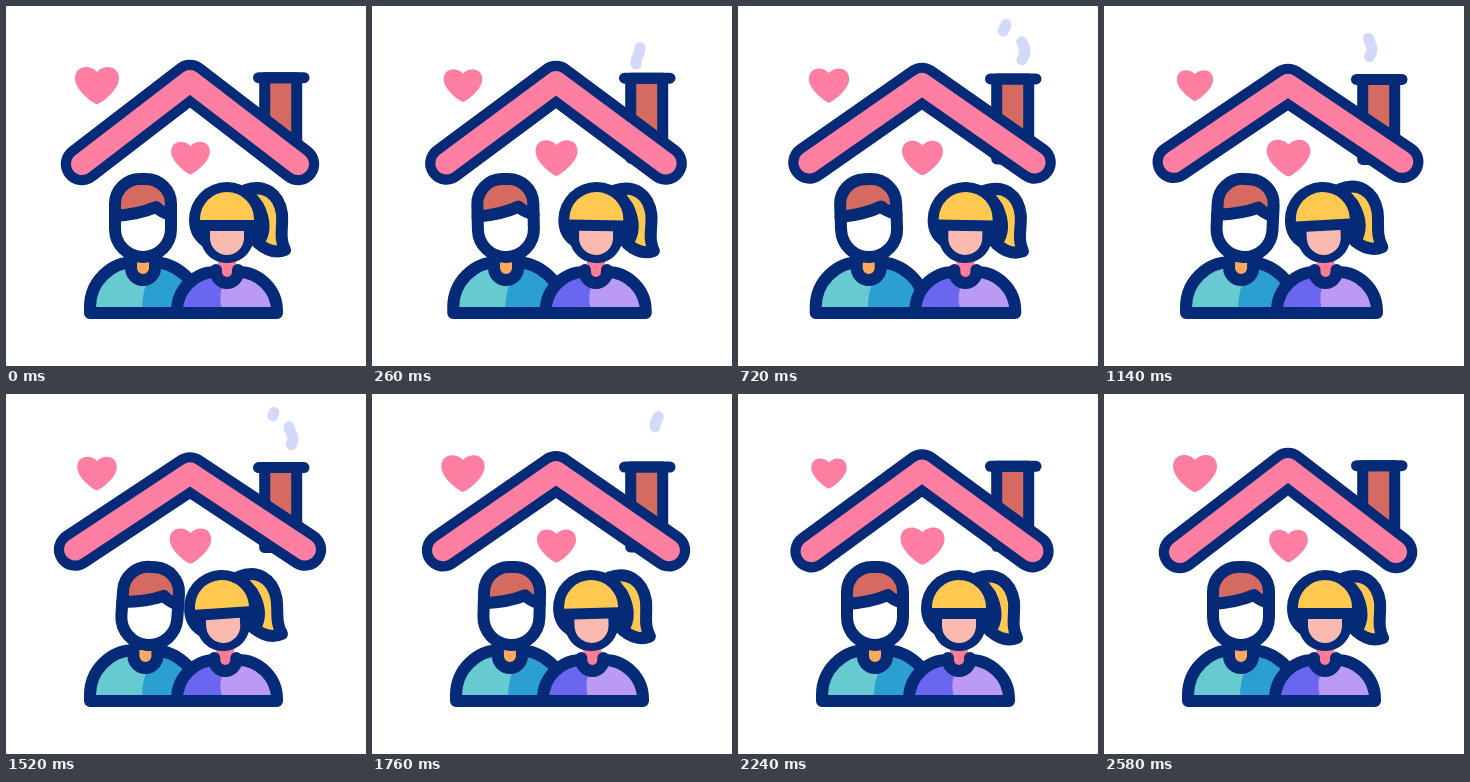
Write an HTML page that moves like this. It is 360 px wide and 360 px high and loops after 2.6 s.

```html
<!DOCTYPE html>
<html lang="en">
<head>
<meta charset="utf-8">
<title>Family home</title>
<style>
  html, body { margin: 0; width: 100%; height: 100%; overflow: hidden; background: #fff; }
  svg { display: block; width: 100vw; height: 100vh; }
  .line { fill: none; stroke: #042a78; stroke-width: 12; stroke-linecap: round; stroke-linejoin: round; }
  .thin { stroke-width: 11; }
  .roof, .smoke { fill: none; stroke-linecap: round; stroke-linejoin: round; }
  .smoke { stroke: #d3daf9; stroke-width: 11; }
</style>
</head>
<body>
<svg viewBox="0 0 360 360">
  <defs>
    <path id="heart" fill="#ff7fa3" d="M0 18.700C-3 18.700-22 5-22-7C-22-14.500-17-18.500-11-18.500C-6-18.500-2-16 0-13.500C2-16 6-18.500 11-18.500C17-18.500 22-14.500 22-7C22 5 3 18.700 0 18.700Z"/>
    <path id="manShape" d="M84 307V301A45 45 0 0 1 129 256H145A48 45 0 0 1 193 301V307Z"/>
    <path id="womanShape" d="M171 307V305A39 39 0 0 1 210 266H232A39 39 0 0 1 271 305V307Z"/>
    <path id="manFace" d="M109 198A25 25 0 0 1 134 173H140A25 25 0 0 1 165 198V223A28 28 0 0 1 109 223Z"/>
  </defs>

  <path id="smoke0" class="smoke"/>
  <path id="smoke1" class="smoke"/>

  <g id="chimney">
    <path class="line thin" style="fill:#d46a60" d="M258.700 0V80H290.700V0Z"/>
    <path class="line thin" d="M252.500 0H298"/>
  </g>
  <path id="roofEdge" class="roof" stroke="#042a78" stroke-width="42.500"/>
  <path id="roofFill" class="roof" stroke="#ff7fa3" stroke-width="22"/>

  <use id="heart0" href="#heart"/>
  <use id="heart1" href="#heart"/>

  <g id="manBody">
    <use href="#manShape" fill="#66cad0"/>
    <path fill="#2a9fd0" d="M149 262C138 278 136 290 136 307H193V301A48 45 0 0 0 149 256Z"/>
    <use href="#manShape" class="line"/>
  </g>
  <g id="manNeck">
    <path class="line" style="fill:#ffa95f" d="M125 256V262A12 12 0 0 0 149 262V256"/>
  </g>
  <g id="manHead">
    <use href="#manFace" fill="#fff"/>
    <path fill="#d46a60" d="M109 210V198A25 25 0 0 1 134 173H140A25 25 0 0 1 165 198V209L150 201Q134 208 109 210Z"/>
    <path class="line" d="M109 210Q134 208 150 201Q155 206 165 209"/>
    <use href="#manFace" class="line"/>
  </g>

  <g id="womanBody">
    <use href="#womanShape" fill="#6b66f0"/>
    <path fill="#bb9af5" d="M226 268C212 280 213 294 217 307H271V305A39 39 0 0 0 232 266Z"/>
    <use href="#womanShape" class="line"/>
  </g>
  <g id="womanNeck">
    <path fill="#ff7c96" d="M212 252H230V268H212Z"/>
    <path class="line" style="fill:#ff7c96" d="M210 264V266A11 11 0 0 0 232 266V264"/>
  </g>
  <g id="womanHead">
    <path class="line" style="fill:#ffc850" d="M240 184C258 178 273 187 276 208C277 222 273 232 279 244C269 248 259 243 252 237C260 226 259 214 252 200Z"/>
    <path fill="#042a78" d="M183 214A38 38 0 0 1 259 214C259 226 254 234 246 240C241 252 231 257 221 257C211 257 201 252 196 240C188 234 183 226 183 214Z"/>
    <path fill="#ffc850" d="M194 214V213A27 27 0 0 1 248 213V214Z"/>
    <path fill="#fbbab0" d="M204 225H238V232A17 17 0 0 1 204 232Z"/>
  </g>
</svg>
<script>
const LOOP = 2600, START = 60, RELEASE = 1700, REST = 2520;
const set = (id, name, value) => document.getElementById(id).setAttribute(name, value);
const part = (t, a, b) => Math.min(Math.max((t - a) / (b - a), 0), 1);
const ease = (t, a, b) => { const u = part(t, a, b); return u * u * (3 - 2 * u); };

// The roof sags slowly, then springs back with a damped swing
function sag(t) {
  if (t < RELEASE) return 1 - (1 - part(t, START, RELEASE)) ** 2;
  return Math.cos(Math.PI * (t - RELEASE) / 270) * (1 - part(t, RELEASE, REST));
}

function drawHouse(t) {
  const bend = sag(t), down = Math.max(bend, 0), up = Math.min(bend, 0);
  const x = 76 - 7 * bend, y = 158 - 2.5 * Math.abs(bend);
  const roof = `M${x} ${y}L184 ${75 + 4.5 * down + 16 * up}L${368 - x} ${y}`;
  set('roofEdge', 'd', roof);
  set('roofFill', 'd', roof);
  set('chimney', 'transform', `translate(0 ${71.7 + 1.9 * down + 23 * up})`);
}

function drawHeart(id, x, y, width) {
  set(id, 'transform', `translate(${x} ${y}) scale(${width / 44})`);
}

// Wavy dashes rise along a path and are trimmed at both of its ends
function drawSmoke(t, side) {
  const bottom = 58, length = 18, top = side ? 22.5 : 18.5;
  let d = '';
  for (let puff = 0; puff < 2; puff++) {
    const start = 40 + 760 * puff + 385 * side;
    const head = bottom - 0.075 * (t - start), tail = head + length;
    if (head > bottom || tail < top) continue;
    const from = Math.max(head, top), to = Math.max(Math.min(tail, bottom), from + 0.1);
    for (let i = 0; i <= 8; i++) {
      const y = from + (to - from) * i / 8;
      const x = 266 + 19 * side + 2 * Math.cos((y - 43 - 2 * side) * Math.PI / 13);
      d += `${i ? 'L' : 'M'}${x.toFixed(2)} ${y.toFixed(2)}`;
    }
  }
  set('smoke' + side, 'd', d);
}

function drawPerson(name, x, bodyX, headX, angle) {
  set(name + 'Body', 'transform', `translate(${bodyX} 0)`);
  set(name + 'Neck', 'transform', `translate(${bodyX + 0.35 * (headX - bodyX)} 0)`);
  set(name + 'Head', 'transform', `translate(${headX} 0) rotate(${angle} ${x} 214)`);
}

function draw(t) {
  drawHouse(t);

  const beat = Math.cos(6 * Math.PI * part(t, START, REST));
  drawHeart('heart0', 91, 79.5, 38.5 + 5.5 * beat);
  drawHeart('heart1', 184.5, 152, 42.2 - 3.5 * beat);

  drawSmoke(t, 0);
  drawSmoke(t, 1);

  // The pair moves apart, then the heads lean together
  const apart = ease(t, START, 500) - ease(t, 700, 1400);
  const close = ease(t, 500, 1300) - ease(t, 1500, 1950);
  drawPerson('man', 137, -6.3 * apart, 7 * close - 7.6 * apart, 4 * close - 3 * apart);
  drawPerson('woman', 221, 6.3 * apart, 7.6 * apart - 5 * close, 2 * apart - 4 * close);
}

const begin = performance.now();
function tick() {
  draw((performance.now() - begin) % LOOP);
  requestAnimationFrame(tick);
}
draw(0);
requestAnimationFrame(tick);
</script>
</body>
</html>
```
